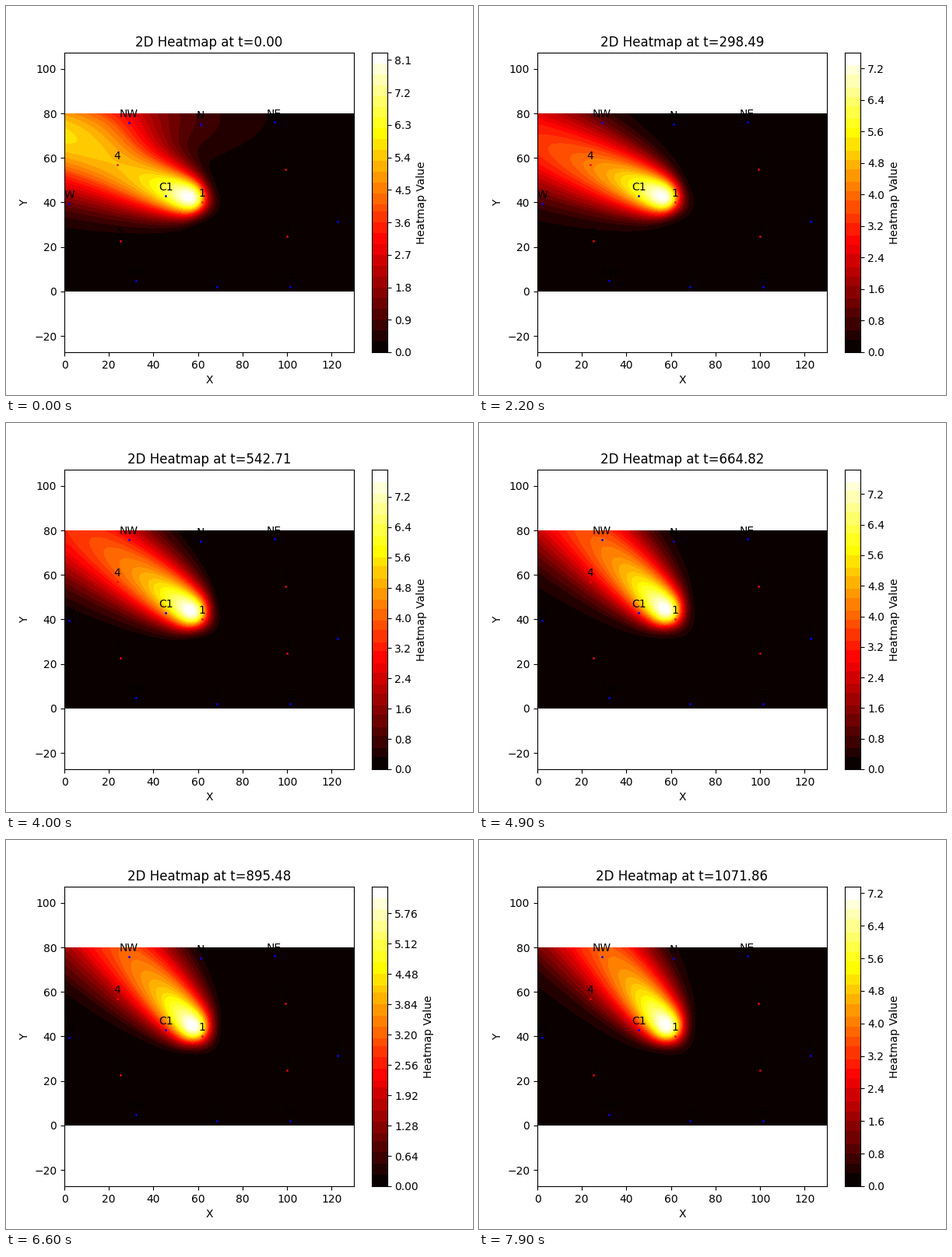
Recreate the animation shown at these times as a matplotlib script. Size 600 by 500 pixels, loop 8 s.

```python
import math

import numpy as np
import matplotlib.pyplot as plt
from matplotlib.animation import FuncAnimation

FRAMES, INTERVAL = 80, 100
DT = 2700 / 199
SOURCE = (61.9, 40.2)
CMAP = plt.get_cmap("hot", 28)

BLUE = {"NW": (29, 75.7), "N": (61, 75), "NE": (94.2, 76), "W": (2.2, 39.4),
        "E": (122.8, 31.3), "SE": (101.2, 2), "S": (68.5, 2),
        "SW": (32.3, 4.8), "C1": (45.6, 43.1)}
RED = {"1": (61.9, 40.2), "2": (99.4, 54.7), "3": (100, 24.8),
       "4": (23.6, 56.8), "5": (25.3, 22.6)}

# Wind angle (degrees above west) and peak value over the loop.
ANGLE = ([0, 12, 31, 40, 57, 66, 79],
         [20, 19.5, 27, 35.5, 52, 47, 50])
PEAK = ([0, 3, 6, 9, 12, 20, 31, 37, 45, 57, 63, 66, 72, 79],
        [8.25, 7.6, 7.0, 7.1, 7.72, 7.5, 7.72, 7.88, 7.88, 7.56, 6.7, 6.28,
         6.85, 7.32])

X, Y = np.meshgrid(np.linspace(0, 130, 196), np.linspace(0, 80, 121))


def plume(angle):
    """Steady plume: diffusing across the wind, smooth front at the source."""
    c, s = math.cos(angle), math.sin(angle)
    dx, dy = X - SOURCE[0], Y - SOURCE[1]
    along, across = -c * dx + s * dy, s * dx + c * dy
    var = 17 + 3.2 * 3 * np.logaddexp(0, along / 3)
    front = 1 / (1 + np.exp(-1.7 * (along - 1) / 4))
    return 52 * front / np.sqrt(var) * np.exp(-across ** 2 / (2 * var))


def remnant(i):
    """Older cloud in the upper left that drifts out and fades."""
    dx = np.abs(X - 5 + 2 * i) / 42
    bump = np.exp(-((Y - 78) / 14) ** 2 / 2)
    return 2.6 * math.exp(-i / 4) * bump / (1 + dx ** 3)


def field(i):
    z = plume(math.radians(np.interp(i, *ANGLE))) + remnant(i)
    return z * np.interp(i, *PEAK) / z.max()


fig = plt.figure(figsize=(6, 5), dpi=100)
ax = fig.add_axes([0.125, 0.11, 0.62, 0.77])
cax = fig.add_axes([0.78375, 0.11, 19.25 / 600, 0.77])

half = 130 * 385 / 372 / 2
ax.set(xlim=(0, 130), ylim=(40 - half, 40 + half), xlabel="X", ylabel="Y")
ax.set_autoscale_on(False)
title = ax.set_title("")

for group, color in ((BLUE, "blue"), (RED, "red")):
    for name, pos in group.items():
        ax.plot(*pos, "o", color=color, markersize=1)
        ax.annotate(name, pos, xytext=(0, 5), textcoords="offset points",
                    ha="center")

cax.set_xticks([])
cax.yaxis.tick_right()
cax.yaxis.set_label_position("right")
cax.set_ylabel("Heatmap Value")

shown = []


def update(i):
    while shown:
        shown.pop().remove()
    cs = ax.contourf(X, Y, field(i), levels=100, cmap=CMAP)
    levels = cs.levels
    bar = cax.pcolormesh([0, 1], levels, np.reshape(cs.cvalues, (-1, 1)),
                         cmap=CMAP)
    shown.extend([cs, bar])
    cax.set_yticks(levels[::math.ceil(len(levels) / 10)])
    cax.set(xlim=(0, 1), ylim=(levels[0], levels[-1]))
    title.set_text(f"2D Heatmap at t={i * DT:.2f}")
    return shown


anim = FuncAnimation(fig, update, frames=FRAMES, interval=INTERVAL,
                     init_func=lambda: update(0), repeat=True, repeat_delay=0,
                     blit=False)
plt.show()
```
